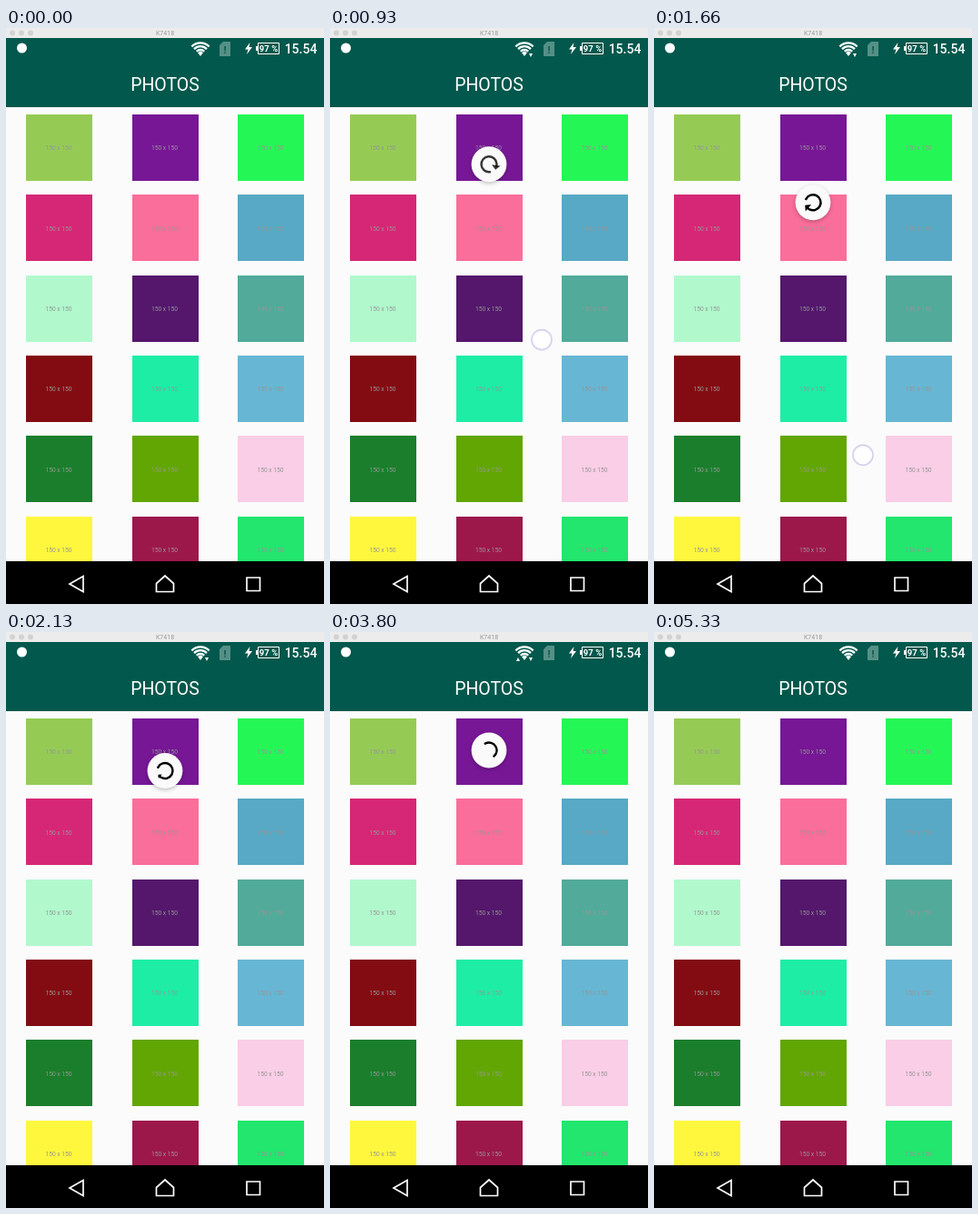
An HTML page with a canvas that plays this animation: 350x633 px, repeating every 5400 ms.

```html
<!DOCTYPE html>
<html>
<head>
<meta charset="utf-8">
<style>
html, body { margin: 0; width: 100%; height: 100%; overflow: hidden; }
canvas { display: block; }
</style>
</head>
<body>
<canvas id="stage" width="350" height="633"></canvas>
<script>
const ctx = document.getElementById('stage').getContext('2d');
const LOOP = 5400, DP = 0.97, TOP = 87, BOTTOM = 586, MID = 175;
const RELEASE = 2054, FINISH = RELEASE + 200, SPIN = FINISH + 666, DONE = 4600, CYCLE = 1332;
const DRAG_FROM = 258.5, SLING = 64 * DP, REST_Y = 130;
const TILES = ('95cb55 771796 24f755 d62776 f96e9a 57a9c5 b1f8cd 54176c 51aa9a ' +
  '830c13 1eeda6 67b6d4 1b7e2c 61a603 f9cee6 fef73e 9c184b 22e66d').split(' ');
const TOUCH = [[130, 250], [400, 285], [930, 342], [1660, 469], [RELEASE, 490]];

const clamp = (v, lo = 0, hi = 1) => Math.min(hi, Math.max(lo, v));
const mix = (a, b, k) => a + (b - a) * k;

// cubic-bezier(.4, 0, .2, 1)
function fastOutSlowIn(x) {
  let lo = 0, hi = 1, s;
  for (let i = 0; i < 20; i++) {
    s = (lo + hi) / 2;
    if (1.2 * s * (1 - s) ** 2 + 0.6 * s * s * (1 - s) + s ** 3 < x) lo = s; else hi = s;
  }
  return s * s * (3 - 2 * s);
}

function rect(x, y, w, h, color) {
  ctx.fillStyle = color;
  ctx.fillRect(x, y, w, h);
}

function disc(x, y, r, color) {
  ctx.fillStyle = color;
  ctx.beginPath();
  ctx.arc(x, y, r, 0, 7);
  ctx.fill();
}

function poly(points, color, stroke) {
  ctx.beginPath();
  for (let i = 0; i < points.length; i += 2) ctx.lineTo(points[i], points[i + 1]);
  ctx.closePath();
  ctx.fillStyle = ctx.strokeStyle = color;
  ctx.lineWidth = stroke;
  if (stroke) ctx.stroke(); else ctx.fill();
}

function label(text, x, y, font, color) {
  ctx.font = font + ' Roboto, sans-serif';
  ctx.fillStyle = color;
  ctx.textAlign = 'center';
  ctx.fillText(text, x, y);
}

function drawWifi(t) {
  ctx.strokeStyle = '#fff';
  ctx.lineWidth = 2.3;
  ctx.lineCap = 'butt';
  for (const r of [6, 9.8, 13.6]) {
    ctx.beginPath();
    ctx.arc(214, 30, r, -Math.PI * 0.75, -Math.PI * 0.25);
    ctx.stroke();
  }
  poly([214, 31, 211, 27, 214, 25.5, 217, 27], '#fff');
  if (t >= 2700 && t < 4300) poly([205, 32, 207, 28, 209, 32], '#fff');
  if (t >= 200 && t < 2700 || t >= 3300 && t < 4300) poly([219, 28, 223, 28, 221, 32], '#fff');
}

function drawBars(t) {
  rect(0, 0, 350, 11, '#ececec');
  for (const x of [7, 17, 27]) disc(x, 5.5, 3, '#d2d2d2');
  label('K7418', MID, 8, '7px', '#999');

  rect(0, 11, 350, TOP - 11, '#02584c');
  disc(17.5, 22, 5.5, '#fff');
  drawWifi(t);
  poly([239, 15, 247, 15, 247, 31, 235, 31, 235, 19], '#559087');
  label('!', 241, 27.5, 'bold 11px', '#02584c');
  poly([268.5, 16, 263, 23.5, 266.5, 23.5, 265, 29, 271, 21, 267.5, 21], '#fff');
  poly([277.5, 16.5, 300.5, 16.5, 300.5, 28.5, 277.5, 28.5], '#fff', 1);
  rect(275, 20, 2, 5, '#fff');
  label('97 %', 289, 26.2, 'bold 9.5px', '#fff');
  label('15.54', 324.5, 28, '500 14px', '#fff');
  label('PHOTOS', MID, 69, '19.5px', '#fff');

  rect(0, BOTTOM, 350, 633 - BOTTOM, '#000');
  poly([70, 611, 85, 602.5, 85, 619.5], '#fff', 1.7);
  poly([175, 602, 184.5, 610.5, 184.5, 619.5, 165.5, 619.5, 165.5, 610.5], '#fff', 1.7);
  poly([265, 604, 279.5, 604, 279.5, 618.5, 265, 618.5], '#fff', 1.7);
}

function drawTiles() {
  rect(0, 0, 350, 633, '#fbfbfb');
  TILES.forEach((color, i) => {
    const x = 22 + (i % 3) * 116.5, y = 95 + Math.floor(i / 3) * 88.3;
    rect(Math.round(x), Math.round(y), 73, 73, '#' + color);
    label('150 x 150', x + 36, y + 39.3, '6.7px', '#969696');
  });
}

function touchY(t) {
  const i = TOUCH.findIndex(([time]) => time > t);
  if (i < 1) return null;
  const [t0, y0] = TOUCH[i - 1], [t1, y1] = TOUCH[i];
  return mix(y0, y1, (t - t0) / (t1 - t0));
}

// Arc start, end and rot are in turns.
function dragPose(t) {
  const pull = (touchY(t) - DRAG_FROM) / SLING;
  const percent = clamp(pull), shown = Math.max(percent - 0.4, 0) * 5 / 3;
  const extra = clamp(pull - 1, 0, 2) / 4, tension = (extra - extra * extra) * 2;
  return {
    y: TOP - 20 * DP + SLING * (percent + tension * 2),
    start: 0, end: shown * 0.8, arrow: shown,
    rot: (-0.25 + 0.4 * shown + tension * 2) / 2,
    alpha: mix(0.3, 1, clamp((t - 725) / 300)), scale: 1
  };
}

function spinnerPose(t) {
  if (t < RELEASE) return dragPose(t);
  const held = dragPose(RELEASE - 1);
  if (t < FINISH) {
    const k = (t - RELEASE) / 200;
    return { ...held, y: mix(held.y, REST_Y, 1 - (1 - k) ** 2), arrow: 1 - k };
  }
  const pose = { ...held, y: REST_Y, arrow: 0, scale: clamp(1 - (t - DONE) / 150) };
  if (t < SPIN) {
    const k = (t - FINISH) / 666;
    return { ...pose, start: 0.79 * k, rot: mix(held.rot, 1, k) };
  }
  const turns = (t - SPIN) / CYCLE, n = Math.floor(turns), k = (turns - n) * 2;
  const base = 0.8 * (n + 1);
  pose.rot = 1 + 0.81 * turns;
  pose.start = k < 1 ? base : base + 0.79 * fastOutSlowIn(k - 1);
  pose.end = k < 1 ? base + 0.01 + 0.79 * fastOutSlowIn(k) : base + 0.8;
  return pose;
}

function drawSpinner({ y, start, end, rot, arrow, alpha, scale }) {
  if (!scale || y < TOP - 20) return;
  ctx.save();
  ctx.translate(MID, y);
  ctx.scale(scale * DP, scale * DP);
  ctx.shadowColor = 'rgba(0,0,0,.25)';
  ctx.shadowBlur = 4;
  ctx.shadowOffsetY = 1.5;
  disc(0, 0, 20, '#fafafa');
  ctx.shadowColor = 'transparent';
  ctx.globalAlpha = alpha;
  if (end > start) {
    ctx.strokeStyle = '#000';
    ctx.lineWidth = 2.5;
    ctx.lineCap = 'square';
    ctx.beginPath();
    ctx.arc(0, 0, 8.75, (start + rot) * 2 * Math.PI, (end + rot) * 2 * Math.PI);
    ctx.stroke();
  }
  if (arrow > 0) {
    ctx.rotate((end + rot) * 2 * Math.PI - 0.087);
    ctx.translate(8.75, 0);
    ctx.scale(arrow, arrow);
    poly([-5.6, 0, 4.4, 0, -0.6, 5], '#000');
  }
  ctx.restore();
}

function drawTouch(y) {
  if (y === null) return;
  const x = 230 + 3 * Math.exp(-(((y - 342) / 40) ** 2));
  disc(x, y, 11, 'rgba(255,255,255,.9)');
  ctx.strokeStyle = '#d3d0ee';
  ctx.lineWidth = 1.6;
  ctx.stroke();
}

function draw(t) {
  drawTiles();
  ctx.save();
  ctx.beginPath();
  ctx.rect(0, TOP, 350, BOTTOM - TOP);
  ctx.clip();
  if (t >= TOUCH[0][0]) drawSpinner(spinnerPose(t));
  ctx.restore();
  drawTouch(touchY(t));
  drawBars(t);
}

// The picture advances 15 times a second.
function tick() {
  const t = performance.now() % LOOP;
  const step = Math.floor((Math.floor(t / 10) + 0.67) * 0.15);
  draw(step * 1000 / 15);
  requestAnimationFrame(tick);
}
tick();
</script>
</body>
</html>
```
